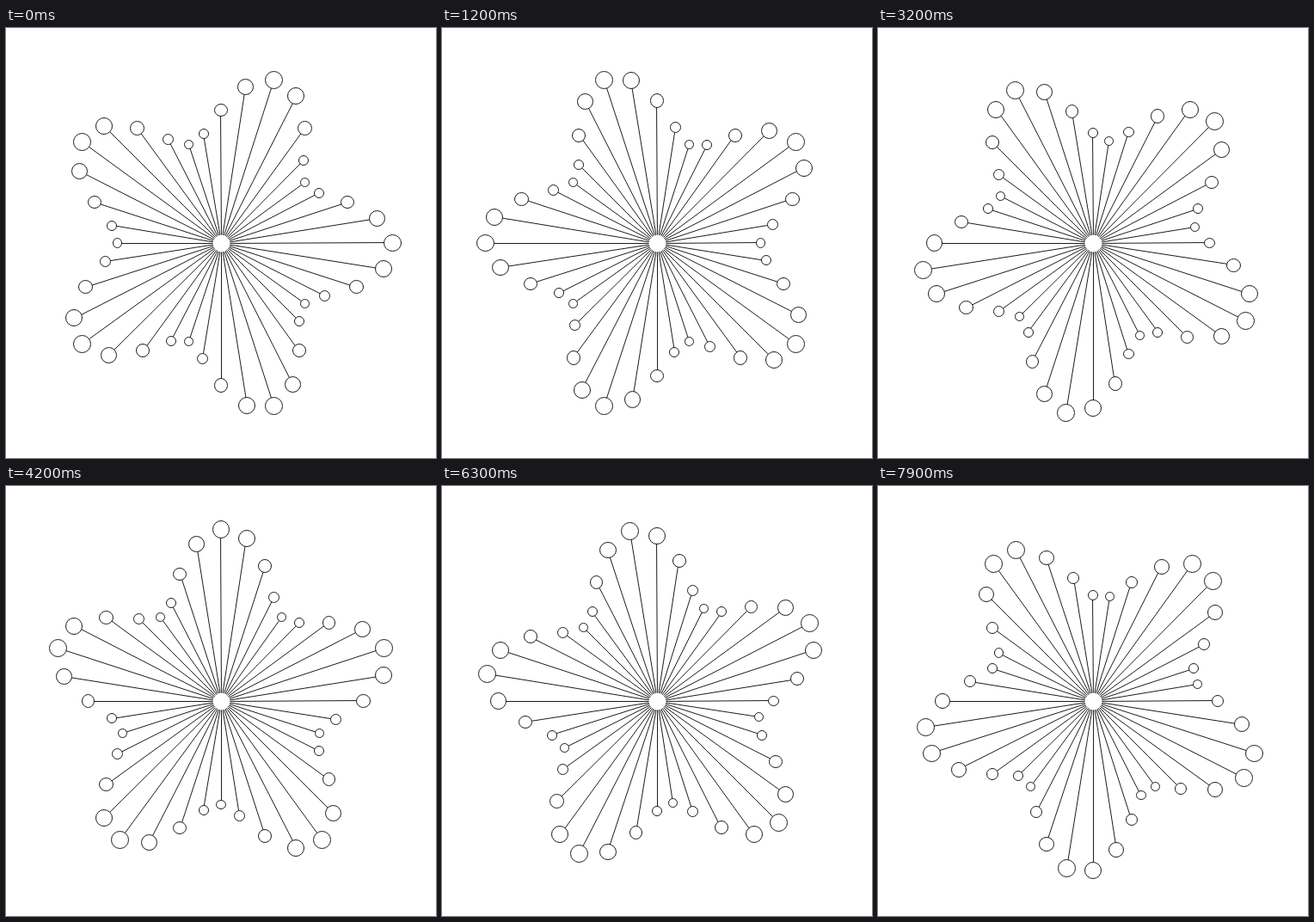
Recreate the animation shown at these times as an HTML page with a canvas. Size 500 by 500 pixels, loop 8000 ms.

```html
<!DOCTYPE html>
<html lang="en">
<head>
<meta charset="utf-8">
<title>Pulsing star</title>
<style>
  html, body { margin: 0; width: 100%; height: 100%; overflow: hidden; background: #fff; }
  canvas { display: block; }
</style>
</head>
<body>
<canvas id="stage" width="500" height="500"></canvas>
<script>
const ctx = document.getElementById('stage').getContext('2d');
const CENTER = 250, SPOKES = 40, ARMS = 5;
const LOOP = 8000, STEP = 100, PERIOD = 2401;
const TAU = Math.PI * 2;
const START = -7.7 / 360 * TAU;

// Centre of the pixel that holds a coordinate
const snap = v => Math.floor(v) + 0.5;

// Ellipse inside the pixel-aligned box around a circle
function ring(x, y, r) {
  const left = snap(x - r), right = snap(x + r);
  const top = snap(y - r), bottom = snap(y + r);
  ctx.beginPath();
  ctx.ellipse((left + right) / 2, (top + bottom) / 2,
    (right - left) / 2, (bottom - top) / 2, 0, 0, TAU);
  ctx.fill();
}

function drawSpoke(angle, wave) {
  const length = 160 + 40 * wave;
  const x = CENTER + Math.cos(angle) * length;
  const y = CENTER + Math.sin(angle) * length;

  ctx.beginPath();
  ctx.moveTo(snap(CENTER), snap(CENTER));
  ctx.lineTo(snap(x), snap(y));
  ctx.stroke();

  ring(x, y, 7.5 + 2.5 * wave);
  ctx.stroke();
}

function draw(time) {
  ctx.fillStyle = '#fff';
  ctx.strokeStyle = '#1c1c1c';
  ctx.lineWidth = 1;
  ctx.fillRect(0, 0, 500, 500);
  for (let i = 1; i <= SPOKES; i++) {
    const angle = i * TAU / SPOKES;
    drawSpoke(angle, Math.cos(ARMS * angle + START - time / PERIOD * TAU));
  }
  ring(CENTER, CENTER, 10);
}

// The motion advances in steps of 100 ms
function tick() {
  const time = performance.now() % LOOP;
  draw(Math.floor(time / STEP) * STEP);
  requestAnimationFrame(tick);
}
tick();
</script>
</body>
</html>
```
